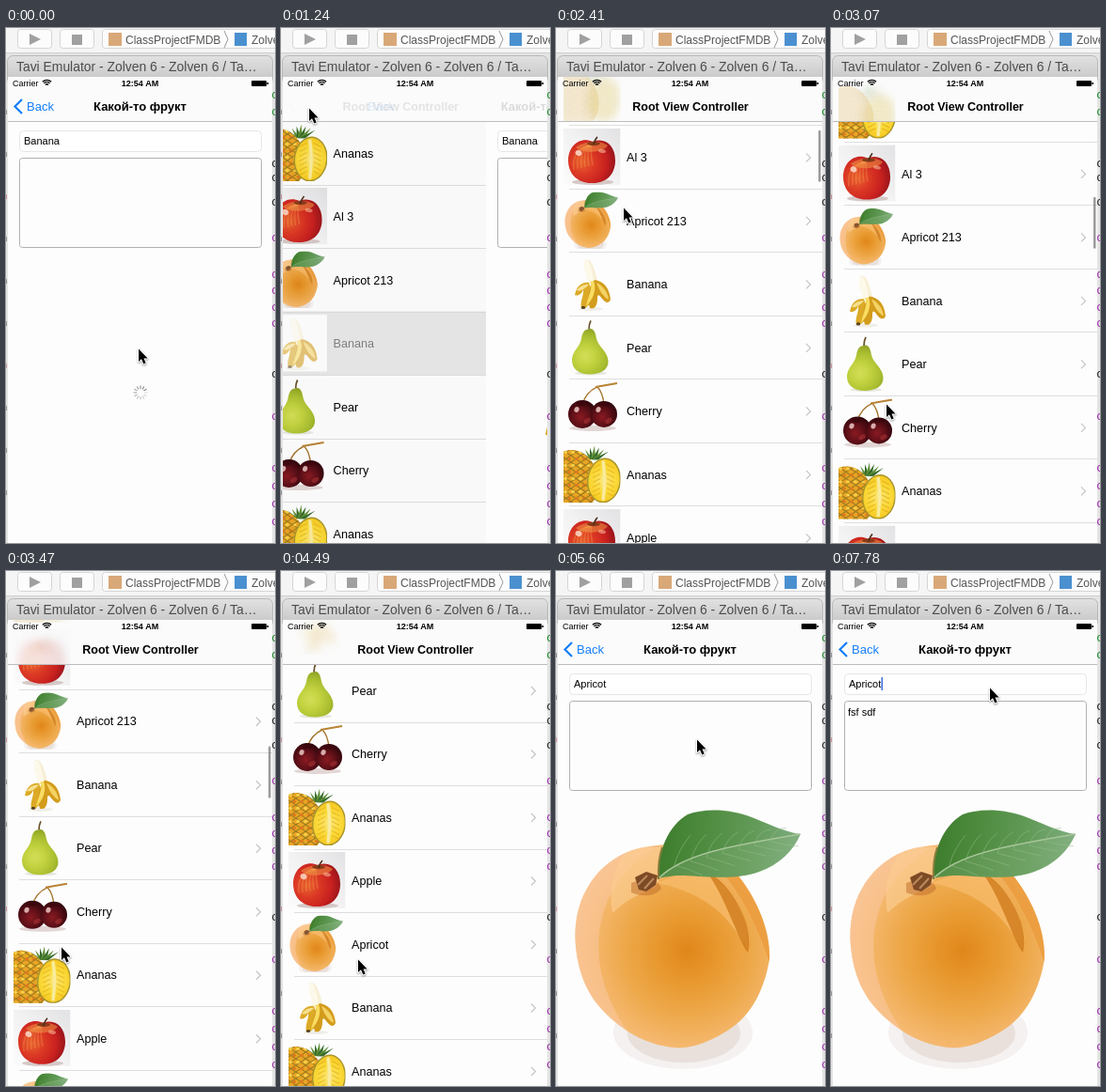
Write an HTML page with a canvas that moves like this. It is 286 px wide and 548 px high and loops after 8000 ms.

```html
<!DOCTYPE html>
<html lang="en">
<head>
<meta charset="utf-8">
<title>Fruit list</title>
<style>
html, body { margin: 0; width: 286px; height: 548px; overflow: hidden; background: #fff; }
canvas { display: block; }
</style>
</head>
<body>
<canvas id="stage" width="286" height="548"></canvas>
<script>
const ctx = document.getElementById('stage').getContext('2d');
const LOOP = 8000, ROW = 67.5, TOP = 99, L = 2, W = 281, K = 4.25;
const SANS = '"Liberation Sans", Arial, sans-serif';
const names = ['Ananas', 'Al 3', 'Apricot 213', 'Banana', 'Pear', 'Cherry', 'Ananas', 'Apple', 'Apricot', 'Banana'];
const kinds = [pineapple, apple, apricot, banana, pear, cherry, pineapple, apple, apricot, banana];

const clamp = (v, a = 0, b = 1) => Math.min(b, Math.max(a, v));
const smooth = p => p * p * (3 - 2 * p);

function rect(x, y, w, h, color) { ctx.fillStyle = color; ctx.fillRect(x, y, w, h); }

function box(x, y, w, h, r, fill, stroke) {
  ctx.beginPath(); ctx.roundRect(x, y, w, h, r);
  if (fill) { ctx.fillStyle = fill; ctx.fill(); }
  if (stroke) { ctx.strokeStyle = stroke; ctx.lineWidth = 1; ctx.stroke(); }
}

function text(s, x, y, size, color = '#000', weight = '', align = 'left') {
  ctx.font = `${weight} ${size}px ${SANS}`;
  ctx.textAlign = align; ctx.fillStyle = color;
  ctx.fillText(s, x, y);
}

function shape(d, fill) { ctx.fillStyle = fill; ctx.fill(new Path2D(d)); }

function line(d, color, width = 1) {
  ctx.strokeStyle = color; ctx.lineWidth = width; ctx.stroke(new Path2D(d));
}

function oval(x, y, rx, ry, fill, turn = 0) {
  ctx.beginPath(); ctx.ellipse(x, y, rx, ry, turn, 0, 7);
  ctx.fillStyle = fill; ctx.fill();
}

function stops(g, colors) {
  colors.forEach((c, i) => g.addColorStop(i / (colors.length - 1), c));
  return g;
}
const glow = (x, y, r, ...colors) => stops(ctx.createRadialGradient(x, y, 0, x, y, r), colors);
const fade = (x, y, x2, y2, ...colors) => stops(ctx.createLinearGradient(x, y, x2, y2), colors);

function scoped(fn) { ctx.save(); fn(); ctx.restore(); }
function clip(x, y, w, h) { ctx.beginPath(); ctx.rect(x, y, w, h); ctx.clip(); }

// ---- fruit, each in a 60 x 60 box ----
function apple() {
  rect(0, 0, 60.5, 60, fade(0, 60, 60, 0, '#fcfcfc', '#f3f2f3', '#e2e1e3'));
  oval(31, 57, 22, 3, '#d5c8c6');
  shape('M31 14C18 8 5 18 5 34C5 49 16 58 29 58C45 59 55 49 55 34C55 18 44 9 31 14Z',
    glow(20, 36, 38, '#e8622f', '#dc3a25', '#c9211f', '#8c1119'));
  shape('M13 20C23 13 39 12 47 18C43 25 22 28 13 20Z', 'rgba(240,150,70,.55)');
  for (let i = 0; i < 6; i++) line(`M30 17Q${8 + i * 4} 22 ${11 + i * 4} ${44 - i}`, 'rgba(250,180,85,.28)', 1.6);
  oval(32, 16, 7, 2.2, '#8a3a1a');
  line('M32 17Q33 12 36 9', '#4a2f1c', 1.6);
  oval(16, 26, 3.5, 3, 'rgba(255,235,220,.75)', .5);
  oval(41, 24, 4, 2, 'rgba(255,210,170,.5)', .2);
}

function apricot() {
  ctx.scale(1 / K, 1 / K);
  oval(121, 237, 74, 39, '#f4f1f0');
  oval(122, 238, 60, 31, '#e9e0db');
  const body = new Path2D('M86 39C58 42 34 58 20 82C8 102 5 124 7 146C10 176 20 198 38 216C58 236 82 250 110 253C130 256 158 244 178 228C200 210 210 180 213 158C214 124 196 90 178 68C160 46 120 32 86 39Z');
  scoped(() => {
    ctx.clip(body);
    rect(0, 30, 220, 230, glow(126, 150, 140, '#e0861a', '#e8992f', '#eea94c', '#f5b971', '#fbc596'));
    shape('M0 40H92C58 62 38 88 32 130C28 168 40 204 62 236L0 240Z', 'rgba(252,200,160,.55)');
    shape('M60 46C78 38 98 38 112 44L92 82C78 88 60 96 46 110C42 88 46 62 60 46Z', 'rgba(252,206,146,.65)');
    shape('M94 78C128 62 150 66 166 82C184 100 192 126 190 148C176 128 160 92 94 78Z', 'rgba(249,190,110,.7)');
    shape('M146 66C164 74 180 96 188 120C192 134 192 146 190 152C180 140 166 92 146 66Z', 'rgba(203,116,18,.7)');
    shape('M156 60L215 60V170C208 144 186 88 156 60Z', 'rgba(235,154,58,.75)');
    shape('M66 78C78 72 96 74 98 84C90 94 74 92 66 88Z', 'rgba(190,108,40,.5)');
  });
  shape('M70 72L82 66L94 70L92 80L82 87L74 85Z', '#7d4a26');
  line('M73 80L83 70M80 84L90 73', '#b98a5c', 2);
  shape('M95 73C94 46 104 18 126 5C144 -2 172 -1 194 8C212 15 230 24 246 26C238 44 224 58 202 66C176 76 140 70 118 70C108 70 100 72 95 73Z',
    fade(95, 30, 246, 40, '#3d7c2c', '#4f8c40', '#629a58', '#7fae80'));
  shape('M95 73C122 48 180 38 246 26C238 44 224 58 202 66C176 76 140 70 118 70Z', 'rgba(140,178,130,.3)');
  line('M95 73C122 46 176 38 246 26', '#a8c69a', 1.6);
  for (let i = 0; i < 7; i++) {
    const x = 112 + i * 17, y = 59 - i * 4.2;
    line(`M${x} ${y}q4 -16 17 -${32 - i * 3}M${x} ${y}q16 4 30 ${11 - i}`, 'rgba(150,190,138,.5)', 1);
  }
  line('M95 74Q94 54 99 40', '#8a7d3c', 2);
}

function banana() {
  oval(29, 57, 13, 2, '#f0eee9');
  shape('M22 5C27 2 31 8 33 16C36 25 39 34 34 42L24 41C28 31 25 22 22 14Z', '#f7efd6');
  shape('M22 5C25 3 27 6 28 10C32 20 33 32 30 41L25 41C28 31 25 22 22 14Z', '#fdf9ea');
  shape('M27 29C19 28 14 33 12 42C16 44 20 40 21 36C22 42 17 50 19 56C26 58 31 48 31 40Z', '#dcaa26');
  shape('M33 26C42 27 49 34 50 47C48 52 44 50 41 46C38 42 36 40 36 46C36 53 33 58 28 56C25 47 26 34 33 26Z', '#d39c1c');
  shape('M28 28C32 33 26 44 24 54C30 49 36 37 32 27Z', '#f9dc62');
  shape('M35 29C42 32 47 39 48 47C42 44 38 37 35 29Z', '#f4d264');
  shape('M14 37C18 32 23 30 27 31C23 35 18 39 14 37Z', '#f6e08f');
  oval(21, 55.5, 2.2, 1.6, '#57421f');
}

function pear() {
  oval(29, 58, 17, 2, '#e6e7e0');
  shape('M27 11C32 9 34 15 35 21C37 30 47 34 47.5 45C48 54 39 59 28 59C16 59 8.5 53 9 43C10 33 17 31 19 21C20 15 22 11 27 11Z',
    glow(23, 40, 33, '#d3de58', '#c2d23f', '#a9bd30', '#84981f'));
  line('M27 11Q27 6 29 2', '#69502a', 1.7);
}

function cherry() {
  oval(31, 49, 25, 3, '#e2d6d5');
  line('M20 24C23 13 29 8 36 5M43 24C42 13 39 8 36 5', '#a5752f', 1.4);
  line('M34 5L57 1', '#b98335', 2);
  for (const [x, r] of [[20, 15], [43, 14]]) {
    oval(x, 34, r, r, glow(x - 2, 37, r * 1.2, '#8a1a22', '#611018', '#31050c'));
    oval(x, 23, 5, 2, '#3d070e');
    oval(x - 6, 29, 2.5, 3, 'rgba(255,225,220,.75)', .4);
    oval(x + 5, 41, 4, 2.5, 'rgba(190,60,60,.45)', -.5);
  }
}

function pineapple() {
  for (let i = 0; i < 7; i++) shape(`M${26 + i} 14L${18 + i * 5} ${Math.abs(i - 3) * 2}L${31 + i} 15Z`, i % 2 ? '#5f8f38' : '#376b2a');
  scoped(() => {
    ctx.beginPath(); ctx.ellipse(12, 36, 25, 32, -.3, 0, 7); ctx.clip();
    rect(-10, 0, 60, 62, '#e9a524');
    for (let i = -4; i < 14; i++) {
      line(`M-8 ${i * 7}L40 ${i * 7 + 32}M-8 ${i * 7 + 14}L40 ${i * 7 - 18}`, '#9a7a20', 1.1);
      for (let j = 0; j < 6; j++) oval(j * 8 - 2 + (i & 1) * 4, i * 7, 2, 1.7, i & 1 ? '#f8cf45' : '#de7a1d');
    }
  });
  oval(43, 37, 18, 24, '#a9962c', .1);
  oval(43, 37, 16.5, 22.5, glow(43, 37, 23, '#fbe67c', '#fadb3c', '#f6c81f'), .1);
  line('M42 16Q45 36 42 58', '#f9eb9c', 3.5);
  for (let i = 0; i < 7; i++) line(`M39 ${20 + i * 5}l-8 4M46 ${20 + i * 5}l8 4`, 'rgba(222,160,18,.55)', 1.2);
}

function fruit(draw, x, y, scale = 1) {
  scoped(() => {
    ctx.translate(x, y); ctx.scale(scale, scale);
    clip(0, 0, 60.5, scale > 1 ? 66 : 60.5);
    rect(0, 0, 61, 66, '#fdfdfd');
    draw();
  });
}

// ---- desktop around the phone window ----
function desktop() {
  rect(0, 0, 286, 548, '#e4e4e4');
  for (let i = 0; i < 30; i++) {
    text('ntr'[i % 3], -5, 92 + i * 15, 11, i % 4 == 2 ? '#b3272d' : '#222');
  }
  const marks = [[75, 0], [93, 0], [148, 1], [163, 1], [189, 1], [227, 2], [266, 2], [283, 2], [301, 2], [318, 2], [372, 1], [417, 2], [472, 2], [491, 2], [510, 2], [529, 2]];
  for (const [y, c] of marks) text('c', 282.5, y, 13, ['#1b8a2d', '#222', '#9a2fa8'][c]);
  rect(0, 0, 286, 27, '#f5f5f5');
  rect(0, 26, 286, 1, '#cfcfcf');
  box(12.5, 1.5, 36, 20, 3, '#fcfcfc', '#d5d5d5');
  box(57.5, 1.5, 36, 20, 3, '#fcfcfc', '#d5d5d5');
  box(102.5, 1.5, 200, 20, 3, '#fcfcfc', '#d5d5d5');
  shape('M25 6L37 12L25 18Z', '#a0a0a0');
  rect(70, 7, 11, 11, '#a0a0a0');
  rect(109, 5, 14, 14, '#d9a878');
  text('ClassProjectFMDB', 127, 16.5, 12, '#555');
  line('M232 3L236 12L232 21', '#999');
  rect(243, 5, 13, 14, '#4a90d0');
  text('Zolven', 261, 16.5, 12, '#555');
  box(1.5, 29.5, 282, 30, 6, fade(0, 29, 0, 52, '#e2e2e2', '#cbcbcb'), '#b8b8b8');
  text('Tavi Emulator - Zolven 6 - Zolven 6 / Ta…', 11, 46, 13.9, '#4c4c4c');
}

// ---- phone screens ----
function list(scroll, shift, selected, glowing) {
  const first = Math.floor(scroll / ROW);
  rect(L, 52, W, 496, '#fdfdfd');
  for (let i = first; i < first + 8; i++) {
    const y = TOP + i * ROW - scroll, on = i === selected ? glowing : 0;
    if (on) rect(L, y, W, ROW, `rgba(217,217,217,${on * .58})`);
    fruit(kinds[i % 10], 8 + shift, y + 3.5);
    if (on) rect(8 + shift, y + 3.5, 60, 60, `rgba(255,255,255,${on * .4})`);
    const ink = Math.round(128 * on);
    text(names[i % 10], 75 + shift, y + 38.7, 12.6, `rgb(${ink},${ink},${ink})`);
    line(`M${266 + shift} ${y + 30}l4.5 4.5l-4.5 4.5`, '#c4c4c8', 1.2);
    rect(14 + shift, Math.round(y + ROW), 300, 1, '#dedee0');
  }
}

function spinner(t) {
  const step = Math.floor(t / 83);
  for (let i = 0; i < 12; i++) {
    const a = i * Math.PI / 6, c = Math.cos(a), s = Math.sin(a);
    const dark = ((i - step) % 12 + 12) % 12 / 12;
    line(`M${143 + c * 4} ${388 + s * 4}L${143 + c * 7.5} ${388 + s * 7.5}`, `rgba(90,90,90,${.18 + dark * .6})`, 1.2);
  }
}

function detail(t, x) {
  const early = t < 3000;
  scoped(() => {
    ctx.translate(x, 0);
    rect(L, 52, W, 496, '#fdfdfd');
    box(14.5, 109.5, 257, 22, 4, '#fff', '#e6e6e6');
    text(early ? 'Banana' : 'Apricot', 19, 124, 11);
    if (early ? t < 260 : t < 5630) spinner(t);
    else fruit(early ? banana : apricot, 14, 254, K);
    box(14.5, 138.5, 257, 95, 3, '#fdfdfd', '#b0b0b0');
    if (early) return;
    const typed = 'fsf sdf'.slice(0, clamp(Math.floor((t - 6730) / 70) + 1, 0, 7));
    text(typed, 18, 154, 11);
    if (t >= 6380 && t < 7670) rect(18 + ctx.measureText(typed).width, 143, 1.5, 14, '#3f6fe0');
    if (t >= 7720) rect(53.5, 113, 1.5, 14, '#3f6fe0');
  });
}

function navBar(v, scroll) {
  rect(L, 52, W, 47, '#fbfbfb');
  if (v === 1 && scroll > 0) scoped(() => {
    clip(L, 52, W, 47);
    ctx.globalAlpha = .13; ctx.filter = 'blur(5px)';
    const top = Math.floor(scroll / ROW);
    for (let i = Math.max(0, top - 1); i <= top; i++) fruit(kinds[i % 10], 8, TOP + i * ROW - scroll + 3.5);
  });
  rect(L, 99, W, 1, '#bdbdbf');
  scoped(() => {
    clip(L, 52, W, 47);
    ctx.globalAlpha = v ** 9;
    text('Root View Controller', 143 - 68 * (1 - v), 87.5, 12.5, '#000', 'bold', 'center');
    ctx.globalAlpha = (1 - v) ** 1.4;
    text('Back', 22 + 91 * v, 88, 13, '#147efb');
    text('Какой-то фрукт', 142.5 + 183 * v, 87.5, 13, '#000', 'bold', 'center');
    ctx.globalAlpha = (1 - v) ** 3;
    line('M17 76L9.5 83.5L17 91', '#147efb', 2.2);
  });
  text('Carrier', 7, 62, 9);
  text('12:54 AM', 142.5, 62, 9, '#000', 'bold', 'center');
  for (const r of [2.2, 4.4, 6.6]) {
    ctx.beginPath(); ctx.arc(43.5, 62, r, -2.35, -.8);
    ctx.strokeStyle = '#000'; ctx.lineWidth = 1.4; ctx.stroke();
  }
  box(261, 56, 16, 6, 1, '#000');
  rect(277.5, 58, 1.5, 2, '#000');
}

function pointer(x, y) {
  scoped(() => {
    ctx.translate(x + 1, y + .5);
    const d = 'M0 0V13.5L3 10.8L5.3 16L7.7 15L5.5 10H9.6Z';
    ctx.lineJoin = 'round';
    ctx.shadowColor = 'rgba(0,0,0,.4)'; ctx.shadowBlur = 2; ctx.shadowOffsetY = 1;
    line(d, '#fff', 2);
    ctx.shadowColor = 'transparent';
    shape(d, '#000');
  });
}

// ---- timing ----
const moves = [
  [60, 140, 341], [710, 29, 85], [1770, 29, 85], [2060, 80, 353], [2290, 80, 353], [2410, 71, 191],
  [2530, 50, 120], [2700, 50, 120], [3070, 58, 400], [3530, 58, 400], [3770, 37, 108], [4250, 37, 108],
  [4490, 81, 413], [5350, 81, 413], [5650, 149, 179], [7100, 149, 179], [7260, 168, 124]
];
const drags = [[2260, 0], [2410, 62], [2530, 190], [2700, 190]];

function track(keys, t, ease) {
  const n = keys.findIndex(k => k[0] > t);
  if (n === 0) return keys[0].slice(1);
  if (n < 0) return keys[keys.length - 1].slice(1);
  const a = keys[n - 1], b = keys[n], p = ease((t - a[0]) / (b[0] - a[0]));
  return a.slice(1).map((v, i) => v + (b[i + 1] - v) * p);
}

function scrollAt(t) {
  if (t < 2700) return track(drags, t, p => p)[0];
  if (t < 3500) return 190 + 600 * (1 - Math.exp((2700 - t) / 172));
  return 790 + 161 * smooth(clamp((t - 3500) / 265));
}

// 0: detail fully shown, 1: list fully shown
function slideAt(t) {
  if (t < 1120) return 0;
  if (t < 1580) return 1 - Math.exp((1080 - t) / 110);
  if (t < 5140) return 1;
  return t < 5610 ? Math.exp((5140 - t) / 100) : 0;
}

function render(t) {
  const v = slideAt(t), scroll = scrollAt(t);
  desktop();
  scoped(() => {
    clip(L, 52, W, 496);
    if (v > 0) {
      const shift = -84 * (1 - v);
      if (t < 3000) list(scroll, shift, 3, 1 - clamp((t - 1300) / 260));
      else list(scroll, shift, 18, t >= 5090 ? 1 : 0);
      rect(L, 52, W, 496, `rgba(0,0,0,${.06 * (1 - v)})`);
    }
    if (v < 1) detail(t, W * v);
    navBar(v, scroll);
    const bar = t < 2250 ? (t > 1580 ? 1 - clamp((t - 1760) / 200) : 0)
      : 1 - clamp((t - 4230) / 200);
    if (v === 1 && bar > 0) box(279, 102 + scroll * .108, 2.5, 55, 1.2, `rgba(90,90,90,${bar * .6})`);
  });
  pointer(...track(moves, t, smooth));
}

const start = performance.now();
function tick() {
  render((performance.now() - start) % LOOP);
  requestAnimationFrame(tick);
}
tick();
</script>
</body>
</html>
```
